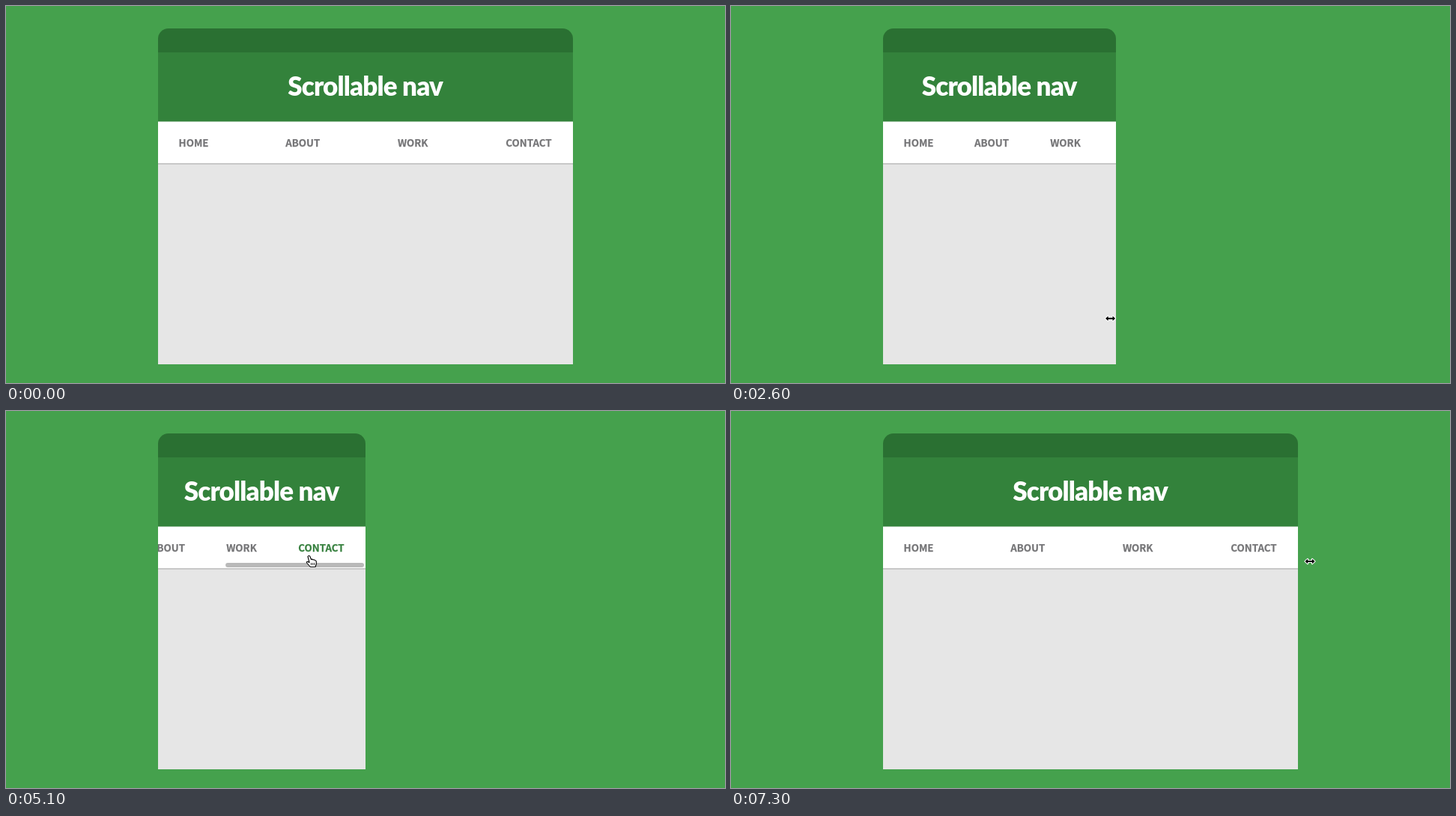
These frames come from a looping animation (960 by 504 pixels, 7400 ms). An HTML page:

```html
<!DOCTYPE html>
<html lang="en">
<head>
<meta charset="utf-8">
<title>Scrollable nav</title>
<style>
  html, body { margin: 0; width: 100%; height: 100%; overflow: hidden; background: #45a14d; }
  svg { display: block; width: 960px; height: 504px; }
  text { text-anchor: middle; }
  #title { font: 900 35px Lato, sans-serif; letter-spacing: -.85px; fill: #fff; }
  .link {
    font: 700 13.3px "Noto Sans CJK JP", "Noto Sans CJK SC", Roboto, sans-serif;
    color: #757577; fill: currentColor; stroke: currentColor; stroke-width: .25;
  }
  .link.hover { color: #37803f; }
  .cursor { stroke-linejoin: round; }
  .dark { fill: #000; stroke: #fff; stroke-width: 2; paint-order: stroke; }
  .light { fill: #fff; stroke: #000; stroke-width: 1.1; }
</style>
</head>
<body>
<svg viewBox="0 0 960 504">
  <defs>
    <clipPath id="page"><path id="outline"/></clipPath>
  </defs>
  <rect width="960" height="504" fill="#45a14d"/>
  <g clip-path="url(#page)">
    <rect x="203" y="30" width="554" height="32" fill="#2a7032"/>
    <rect x="203" y="62" width="554" height="93" fill="#33823b"/>
    <rect x="203" y="211" width="554" height="268" fill="#e6e6e6"/>
    <rect x="203" y="154.5" width="554" height="56" fill="#fff"/>
    <rect x="203" y="210" width="554" height="2" fill="#c8c8c8"/>
    <text id="title" y="120">Scrollable nav</text>
    <g id="links"></g>
    <rect id="thumb" y="203" height="6" rx="3" fill="#b9b9b9"/>
  </g>
  <path id="arrow" class="cursor dark" d="M0 0V13L3 10.2L5.1 15L7.4 14L5.3 9.4H9.3Z"/>
  <path id="resize" class="cursor dark" d="M-6.5 0L-3-3.3V-1H3V-3.3L6.5 0L3 3.3V1H-3V3.3Z"/>
  <g id="hand" class="cursor light">
    <path d="M-2 .5Q-1-1.2 .7 0L2.5 4.5Q4 3.6 5 5Q6.5 4.2 7.5 5.8Q9.2 5.5 9.3 7.5V10.5L8 14.5H1.5L-3 9.5Q-4.2 7.8 -2.7 7.3L0 8.5Z"/>
    <path d="M2.5 9V12M4.6 9V12M6.7 9V12" stroke-width=".8"/>
  </g>
</svg>
<script>
const LOOP = 7400, STEP = 100;
const LEFT = 203, PAD = 28, MIN_GAP = 55;
const WIDE = 554, NARROW = 277;
const $ = id => document.getElementById(id);

const smooth = p => p * p * (3 - 2 * p);
const easeOut = p => 1 - (1 - p) ** 2;
const progress = (t, start, end) => Math.min(1, Math.max(0, (t - start) / (end - start)));

// Eased progress of each phase, in seconds
const phases = t => ({
  enter: smooth(progress(t, 0.8, 1.6)),
  shrink: easeOut(progress(t, 1.7, 3.08)),
  approach: smooth(progress(t, 3.2, 3.565)),
  scroll: smooth(progress(t, 3.8, 4.9)),
  leave: smooth(progress(t, 5.4, 6)),
  pull: smooth(progress(t, 6.14, 7.3)),
  grow: smooth(progress(t, 6.26, 7.3)),
  bar: progress(t, 3.6, 3.8) - progress(t, 5.4, 5.7)
});

function pointerAt(p) {
  const stops = [[p.enter, 765, 416], [p.shrink, 471, 418], [p.approach, 405, 194],
    [p.leave, 480, 197], [p.pull, 773, 201]];
  return stops.reduce(([x, y], [k, toX, toY]) => [x + (toX - x) * k, y + (toY - y) * k], [903, 411]);
}

const links = [["HOME", 39], ["ABOUT", 46], ["WORK", 41], ["CONTACT", 62]].map(([label, width]) => {
  const node = document.createElementNS("http://www.w3.org/2000/svg", "text");
  node.textContent = label;
  node.setAttribute("class", "link");
  node.setAttribute("y", 188);
  $("links").append(node);
  return { node, width };
});
const textWidth = links.reduce((sum, link) => sum + link.width, 0);

function cursorKind(t, hovering) {
  if (t < 0.8) return "none";
  if ((t >= 1.6 && t < 3.2) || t >= 6) return "resize";
  return hovering ? "hand" : "arrow";
}

function draw(t) {
  const p = phases(t);
  const [px, py] = pointerAt(p);
  const width = Math.round(WIDE + (NARROW - WIDE) * (p.shrink - p.grow));
  const edge = LEFT + width;
  const gap = Math.max(MIN_GAP, (width - 2 * PAD - textWidth) / 3);
  const content = 2 * PAD + textWidth + 3 * gap;
  const range = Math.max(0, content - width);
  const scroll = Math.min(range, 132 * p.scroll);

  $("outline").setAttribute("d",
    `M${LEFT} 479V44a14 14 0 0 1 14-14H${edge - 14}a14 14 0 0 1 14 14V479Z`);
  $("title").setAttribute("x", LEFT + width / 2 - 0.4);

  let x = LEFT + PAD - scroll;
  let hovering = false;
  for (const { node, width: w } of links) {
    const over = py > 155 && py < 211 && px >= x && px <= x + w && t < 6;
    node.setAttribute("x", x + w / 2);
    node.classList.toggle("hover", over);
    hovering ||= over;
    x += w + gap;
  }

  const track = width - 4;
  const thumb = track * width / content;
  $("thumb").setAttribute("width", thumb);
  $("thumb").setAttribute("x", LEFT + 2 + (range ? scroll / range : 0) * (track - thumb));
  $("thumb").setAttribute("opacity", p.bar);

  const kind = cursorKind(t, hovering);
  for (const id of ["arrow", "resize", "hand"]) {
    $(id).style.display = id === kind ? "" : "none";
    $(id).setAttribute("transform", `translate(${px} ${py})`);
  }
}

const start = performance.now();
function tick() {
  const elapsed = (performance.now() - start) % LOOP;
  draw(Math.floor(elapsed / STEP) * STEP / 1000);
  requestAnimationFrame(tick);
}
tick();
</script>
</body>
</html>
```
